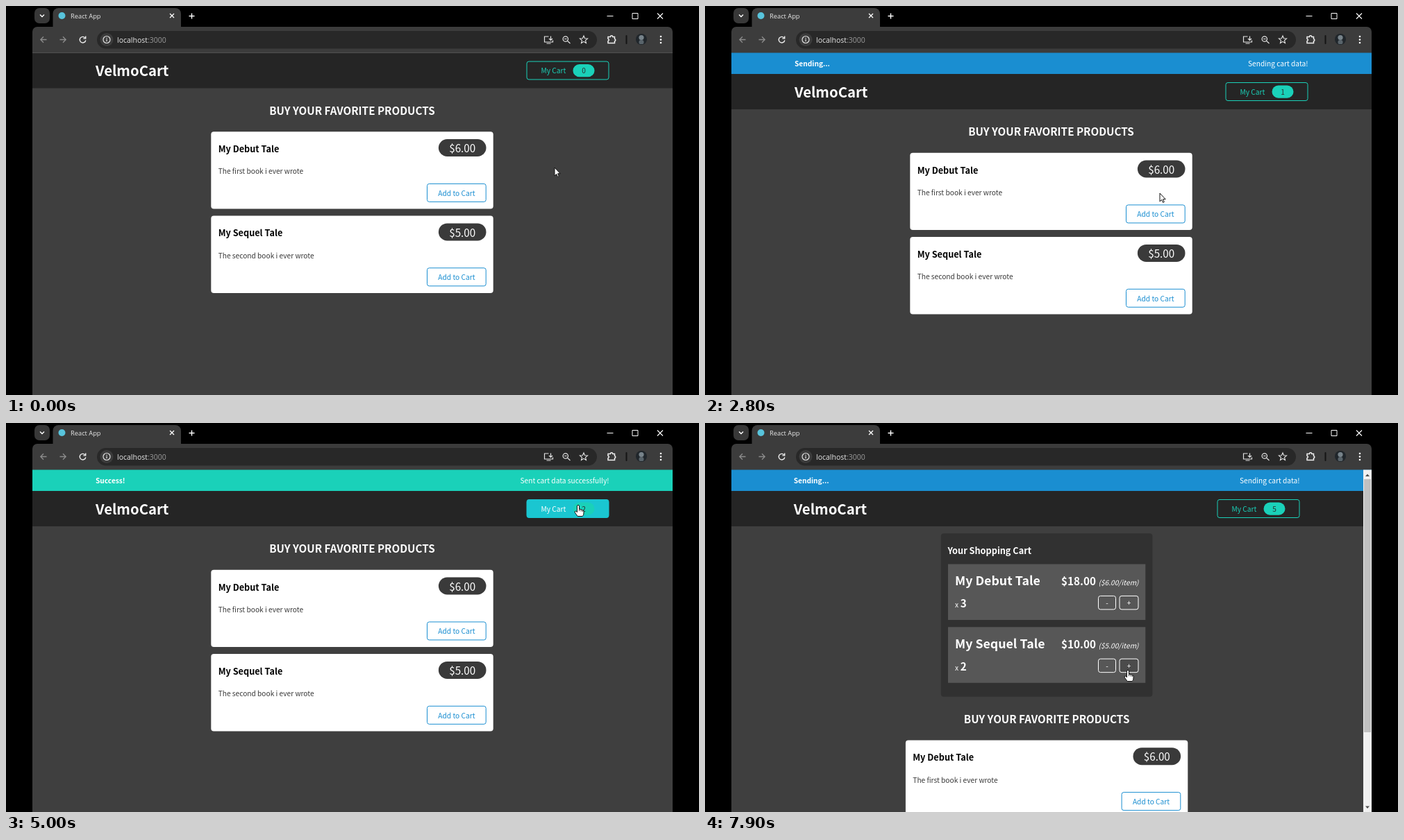
Recreate the animation shown at these times as an HTML page with a canvas. Size 998x561 px, loop 8000 ms.

```html
<!DOCTYPE html>
<html lang="en">
<head>
<meta charset="utf-8">
<title>Cart demo</title>
<style>
  html, body { margin: 0; width: 100%; height: 100%; overflow: hidden; background: #000; }
  canvas { display: block; width: 998px; height: 561px; }
</style>
</head>
<body>
<canvas id="stage" width="998" height="561"></canvas>
<script>
const ctx = document.getElementById('stage').getContext('2d');
const LOOP = 8000, TICK = 100;
const REM = 10.16, BANNER_H = 30.5;
const PAGE_FONT = '"Noto Sans CJK JP", "Noto Sans CJK SC", "Noto Sans", sans-serif';
const UI_FONT = '"Open Sans", "Noto Sans", sans-serif';
const TEAL = '#1ad1b9', CYAN = '#1ac6d1', BLUE = '#1a8ed1';

const BOOKS = [
  { name: 'My Debut Tale', about: 'The first book i ever wrote', price: 6 },
  { name: 'My Sequel Tale', about: 'The second book i ever wrote', price: 5 }
];

// Times at which each book is added
const ADDED = [[2800, 6500, 7000], [4000, 7900]];
// [start of sending, success]
const SAVES = [[2800, 3100], [4000, 4300], [6500, 6700], [7000, 7300], [7900, 8200]];

// Pointer moves: start, end, destination
const MOVES = [
  [0, 500, 814, 95],
  [1900, 2300, 664, 386],
  [2300, 2500, 655, 270],
  [3100, 3500, 658, 419],
  [4400, 4700, 818, 122],
  [4800, 5000, 824, 119],
  [5600, 6200, 615, 260],
  [7200, 7600, 609, 357]
];

const HAND = new Path2D('M-1.5 1Q-1.5-.6 0-.6T1.5 1V5.5Q3 4.6 4 6Q5.6 5.2 6.2 6.8Q8 6.4 8 8.4V11Q8 14 6.2 15.5H-.8Q-2.6 13-4.6 10.2Q-5.6 8.2-3.6 8L-1.5 9.6Z');
const ARROW = new Path2D('M0 0V12L2.7 9.4L4.5 13.4L6.3 12.6L4.6 8.7H8.2Z');

const money = n => '$' + n.toFixed(2);
const countUntil = (times, t) => times.filter(v => v <= t).length;

function pointerAt(t) {
  let x = 790, y = 233;
  for (const [start, end, toX, toY] of MOVES) {
    if (t <= start) break;
    const p = Math.min(1, (t - start) / (end - start));
    const e = p * p * (3 - 2 * p);
    x += (toX - x) * e;
    y += (toY - y) * e;
  }
  return { x, y };
}

function stateAt(t) {
  const qty = ADDED.map(times => countUntil(times, t));
  const save = SAVES.filter(s => s[0] <= t).pop();
  const open = (t >= 800 && t < 1700) || t >= 5300;
  return {
    qty, open,
    total: qty[0] + qty[1],
    banner: save && (t >= save[1] ? 'success' : 'sending'),
    scroll: t >= 5300,
    pointer: pointerAt(t)
  };
}

function box(x, y, w, h, r, fill, stroke) {
  ctx.beginPath();
  ctx.roundRect(x, y, w, h, r);
  if (fill) { ctx.fillStyle = fill; ctx.fill(); }
  if (stroke) { ctx.strokeStyle = stroke; ctx.lineWidth = 1; ctx.stroke(); }
}

function disc(x, y, r, fill) {
  ctx.beginPath();
  ctx.arc(x, y, r, 0, Math.PI * 2);
  ctx.fillStyle = fill;
  ctx.fill();
}

// y is the middle of the capital letters
function text(str, x, y, size, color, { style = '', align = 'left', font = PAGE_FONT } = {}) {
  ctx.font = `${style} ${size}px ${font}`;
  ctx.textAlign = align;
  ctx.fillStyle = color;
  ctx.fillText(str, x, y + size * 0.366);
}

function line(path, x, y, color = '#e3e3e3', width = 1.2) {
  ctx.save();
  ctx.translate(x, y);
  ctx.strokeStyle = color;
  ctx.lineWidth = width;
  ctx.stroke(new Path2D(path));
  ctx.restore();
}

function drawBrowser() {
  ctx.fillStyle = '#000';
  ctx.fillRect(0, 0, 998, 561);
  box(38, 30, 922, 45, [7, 7, 0, 0], '#3c3c3c');
  box(67.5, 3, 184.5, 32, [8, 8, 0, 0], '#3c3c3c');
  box(41, 3, 22, 22, 7, '#383838');
  line('M-3-1.5L0 1.5L3-1.5', 52, 14, '#fff', 1.4);
  disc(80.5, 14, 5, '#58c4dc');
  text('React App', 93, 14.5, 9.3, '#e8e8e8', { font: UI_FONT });
  line('M-3-3L3 3M3-3L-3 3', 239, 14, '#fff', 1.3);
  line('M-4 0H4M0-4V4', 267.5, 14.5, '#fff', 1.4);
  line('M-4.5 0H4.5', 870, 14.5, '#fff', 1);
  line('M-4-4H4V4H-4Z', 906, 14.5, '#fff', 1);
  line('M-4-4L4 4M4-4L-4 4', 942, 14.5, '#fff', 1.1);

  const arrow = 'M4.5 0H-4M0-4.2L-4.2 0L0 4.2';
  line(arrow, 54, 48.5, '#8c8c8c', 1.3);
  line('M-4.5 0H4M0-4.2L4.2 0L0 4.2', 82, 48.5, '#8c8c8c', 1.3);
  line('M3.2-2.8A4.3 4.3 0 1 0 4.3 .8M4.2-5V-1.6H.8', 110.5, 48.5, '#f0f0f0', 1.4);

  box(131, 36, 720, 25.5, 13, '#282828');
  disc(145, 48.5, 9.5, '#3c3c3c');
  line('M-5 0A5 5 0 1 0 5 0A5 5 0 1 0-5 0M0-.8V2.8M0-2.8V-1.6', 145, 48.5);
  text('localhost', 160, 48.8, 10.5, '#e8e8e8', { font: UI_FONT });
  const hostWidth = ctx.measureText('localhost').width;
  text(':3000', 160 + hostWidth, 48.8, 10.5, '#9a9a9a', { font: UI_FONT });

  line('M0-4.5H-6V3.5H6V1M-3 5.5H3M3-5V1M.5-1.5L3 1L5.5-1.5', 781.5, 48.5);
  line('M2-1A3.7 3.7 0 1 0-5.4-1A3.7 3.7 0 1 0 2-1M1 1.8L5 5.5M-3.5-1H.2', 807.5, 48.5);
  line('M0-5.5L1.6-1.8L5.6-1.5L2.5 1.1L3.5 5L0 2.9L-3.5 5L-2.5 1.1L-5.6-1.5L-1.6-1.8Z', 832, 48.5, '#e3e3e3', 1.1);
  line('M-5-3.5H-1.6A1.7 1.7 0 0 1 1.8-3.5H4.5V-.5A1.7 1.7 0 0 1 4.5 2.8V5.5H-5V2.6A1.7 1.7 0 0 0-5-.7Z', 872, 48, '#f0f0f0', 1.5);
  box(892.5, 42, 2, 13, 1, '#151515');
  disc(943, 44, 1.3, '#fff');
  disc(943, 48.5, 1.3, '#fff');
  disc(943, 53, 1.3, '#fff');

  disc(915, 48, 8, '#20262b');
  disc(915, 45.5, 3.6, '#77838a');
  box(911.5, 49, 7, 6, [3, 3, 2, 2], '#59646b');
}

function drawPage(s) {
  const { pointer } = s;
  let hot = false;
  const hovered = (x, y, w, h) => {
    const hit = pointer.x >= x && pointer.x <= x + w && pointer.y >= y && pointer.y <= y + h;
    hot = hot || hit;
    return hit;
  };
  const left = s.scroll ? 127.7 : 129;
  const right = s.scroll ? 856.5 : 868.5;
  const mid = s.scroll ? 492.1 : 498.5;
  let top = 67.5;

  ctx.fillStyle = '#3f3f3f';
  ctx.fillRect(38, top, 922, 494);

  if (s.banner) {
    const done = s.banner === 'success';
    ctx.fillStyle = done ? TEAL : BLUE;
    ctx.fillRect(38, top, 922, BANNER_H);
    text(done ? 'Success!' : 'Sending...', left, top + 16, REM, '#fff', { style: 'bold' });
    text(done ? 'Sent cart data successfully!' : 'Sending cart data!', right, top + 16, REM, '#fff', { align: 'right' });
    top += BANNER_H;
  }

  drawHeader(s, left, right, top, hovered);
  if (!s.banner) {
    ctx.fillStyle = '#505050';
    ctx.fillRect(38, 67, 922, 1);
  }

  let y = top + 51;
  if (s.open) y += drawCart(s, mid, y + 10.2, hovered) + 10.2;
  drawShop(mid, y, hovered);
  if (s.scroll) drawScrollbar();
  return hot;
}

function drawHeader(s, left, right, top, hovered) {
  ctx.fillStyle = '#252525';
  ctx.fillRect(38, top, 922, 51);
  text('VelmoCart', left, top + 26.5, 2 * REM, '#fff', { style: 'bold' });
  const x = right - 118.5, y = top + 12.5;
  const hover = hovered(x, y, 118, 26);
  box(x, y, 118, 26, 3, hover ? CYAN : null, hover ? CYAN : TEAL);
  text('My Cart', x + 20.5, y + 13.5, REM, hover ? '#fff' : TEAL);
  box(x + 66.5, y + 4, 31, 18.3, 9.2, TEAL);
  text(String(s.total), x + 82, y + 13.5, REM, '#2c2c2c', { align: 'center' });
}

// Returns the height of the cart panel
function drawCart(s, mid, y, hovered) {
  const items = BOOKS.map((book, i) => ({ ...book, qty: s.qty[i] })).filter(b => b.qty);
  const height = items.length ? 54 + 90.75 * items.length : 49;
  const x = mid - 152.3;
  box(x, y, 304.6, height, 4, '#313131');
  text('Your Shopping Cart', x + 9.7, y + 25.3, 1.25 * REM, '#fff', { style: 'bold' });
  items.forEach((item, i) => drawCartItem(item, x + 10.2, y + 44.2 + i * 90.75, hovered));
  return height;
}

function drawCartItem(item, x, y, hovered) {
  box(x, y, 284.3, 80.5, 0, '#575757');
  text(item.name, x + 10, y + 24, 1.75 * REM, '#fff', { style: 'bold' });
  text(`(${money(item.price)}/item)`, x + 274.5, y + 27, REM, '#fff', { style: 'italic', align: 'right' });
  text(money(item.price * item.qty), x + 213, y + 25, 1.5 * REM, '#fff', { style: 'bold', align: 'right' });
  text('x', x + 10, y + 59, REM, '#fff');
  text(String(item.qty), x + 17.7, y + 57, 1.5 * REM, '#fff', { style: 'bold' });
  [['-', 216.5, 25], ['+', 247, 27]].forEach(([label, dx, w]) => {
    const hover = hovered(x + dx, y + 46, w, 19.5);
    box(x + dx, y + 46, w, 19.5, 3, hover ? '#4b4b4b' : null, '#fff');
    text(label, x + dx + w / 2, y + 56, REM, '#fff', { align: 'center' });
  });
}

function drawShop(mid, y, hovered) {
  text('BUY YOUR FAVORITE PRODUCTS', mid, y + 32.5, 1.5 * REM, '#fff', { style: 'bold', align: 'center' });
  const x = mid - 203.2;
  BOOKS.forEach((book, i) => {
    const top = y + 62.7 + i * 121.4;
    box(x, top, 406.4, 111.3, 4, '#fff');
    text(book.name, x + 10.4, top + 25.2, 1.25 * REM, '#000', { style: 'bold' });
    text(book.about, x + 10.4, top + 57.5, REM, '#3a3a3a');
    box(x + 327.6, top + 10.8, 68.6, 25, 12.5, '#3a3a3a');
    text(money(book.price), x + 361.9, top + 24.5, 1.5 * REM, '#fff', { align: 'center' });
    const bx = x + 311.2, by = top + 75.2;
    const hover = hovered(bx, by, 84.7, 26);
    box(bx, by, 84.7, 26, 3, hover ? CYAN : null, hover ? CYAN : BLUE);
    text('Add to Cart', bx + 42.4, by + 13.5, REM, hover ? '#fff' : BLUE, { align: 'center' });
  });
}

function drawScrollbar() {
  ctx.fillStyle = '#f1f1f1';
  ctx.fillRect(948, 67.5, 12, 494);
  ctx.fillStyle = '#c1c1c1';
  ctx.fillRect(949, 81, 10, 365);
  ctx.fillStyle = '#505050';
  ctx.fill(new Path2D('M951 77L954 73.5L957 77ZM951 552.5L954 556L957 552.5Z'));
}

function drawPointer({ x, y }, hand) {
  const shape = hand ? HAND : ARROW;
  ctx.save();
  ctx.translate(x, y);
  ctx.lineJoin = 'round';
  ctx.fillStyle = '#fff';
  ctx.strokeStyle = '#111';
  ctx.lineWidth = 1;
  ctx.fill(shape);
  ctx.stroke(shape);
  if (hand) line('M1.5 5.5V8M4 6.2V8.5M6.2 7V9', 0, 0, '#111', 0.8);
  ctx.restore();
}

function render(now) {
  const t = Math.floor((now % LOOP) / TICK) * TICK;
  const state = stateAt(t);
  drawBrowser();
  const hot = drawPage(state);
  drawPointer(state.pointer, hot);
}

const began = performance.now();
function loop() {
  render(performance.now() - began);
  requestAnimationFrame(loop);
}
loop();
</script>
</body>
</html>
```
